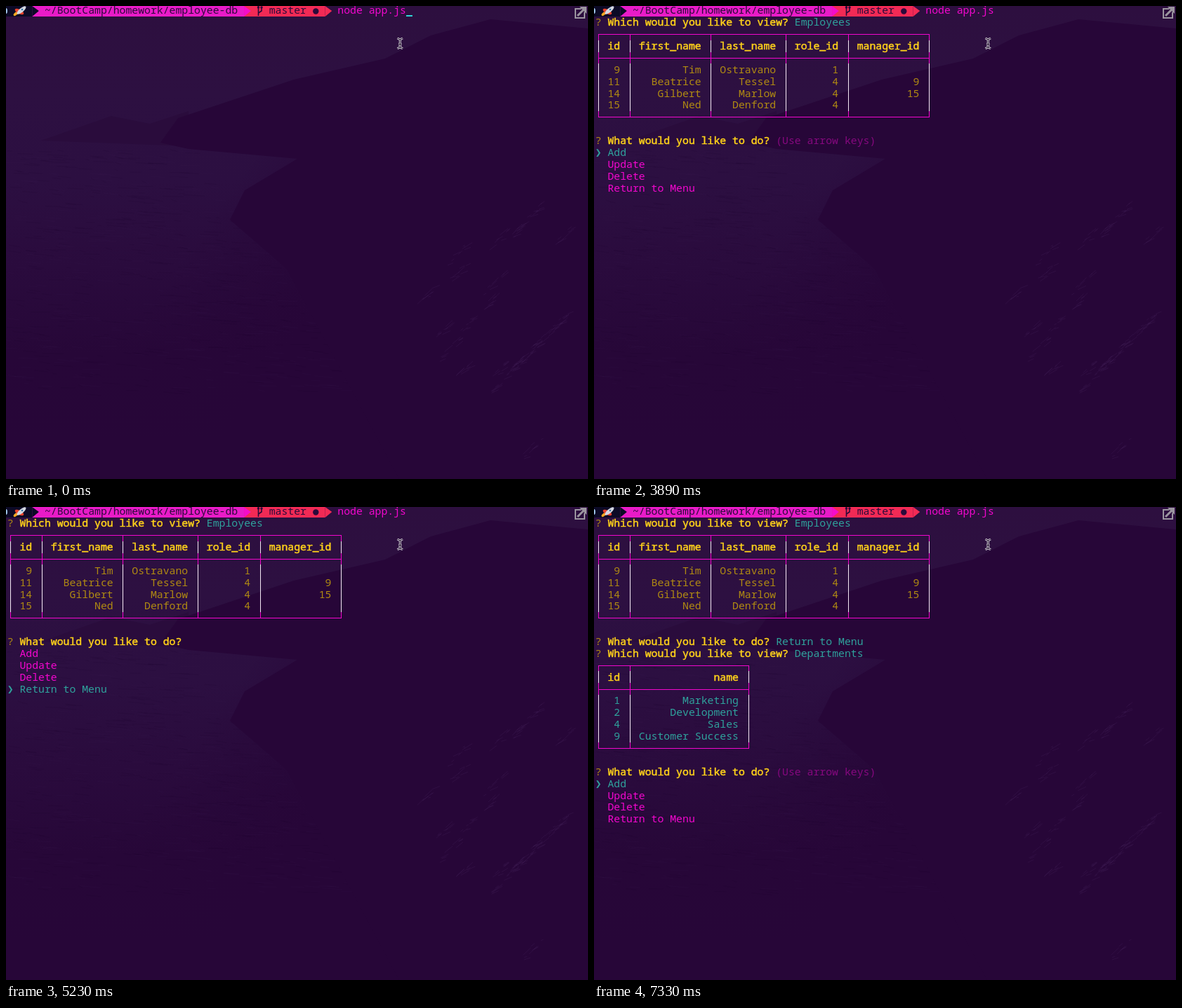
An HTML page with a canvas that plays this animation: 829x675 px, repeating every 8000 ms.

```html
<!DOCTYPE html>
<html lang="en">
<head>
<meta charset="utf-8">
<title>Employee terminal</title>
<style>
html, body { margin: 0; width: 100%; height: 100%; overflow: hidden; background: #270638; }
canvas { display: block; }
</style>
</head>
<body>
<canvas id="stage" width="829" height="675"></canvas>
<script>
const W = 829, H = 675, LOOP = 8000;
const CW = 8.88, LH = 16.88, LEFT = 1.7;
const PINK = '#f207cd', GOLD = '#ffd21a', DIM = '#b08a12', TEAL = '#2fa29c', HINT = '#86087f',
      INK = '#2a0a3b', CURSOR = '#2fd9d9', NAVY = '#0c0a26', RED = '#f22a55', GRAY = '#9b959f';
const VIEW = 'Which would you like to view?', TODO = 'What would you like to do?';
const VIEWS = ['Employees', 'Departments', 'Roles'];
const ACTIONS = ['Add', 'Update', 'Delete', 'Return to Menu'];
const STAFF = [
  'id|first_name|last_name|role_id|manager_id',
  '9|Tim|Ostravano|1|',
  '11|Beatrice|Tessel|4|9',
  '14|Gilbert|Marlow|4|15',
  '15|Ned|Denford|4|'
];
const DEPTS = ['id|name', '1|Marketing', '2|Development', '4|Sales', '9|Customer Success'];

let c = document.getElementById('stage').getContext('2d');
const colX = col => LEFT + col * CW;
const rowY = row => Math.floor(7 + row * LH);

function rect(x, y, w, h, color) {
  c.fillStyle = color;
  c.fillRect(x, y, w, h);
}

function trace(p) {
  c.beginPath();
  for (let i = 0; i < p.length; i += 2) c.lineTo(p[i], p[i + 1]);
}

function poly(color, ...p) {
  trace(p);
  c.fillStyle = color;
  c.fill();
}

function line(color, width, ...p) {
  trace(p);
  c.strokeStyle = color;
  c.lineWidth = width;
  c.stroke();
}

function ellipse(x, y, rx, ry, color, turn = 0) {
  c.beginPath();
  c.ellipse(x, y, rx, ry, turn, 0, 7);
  c.fillStyle = color;
  c.fill();
}

function text(row, col, str, color, strong) {
  const x = colX(col), y = Math.floor(11.9 + row * LH);
  c.font = '14.8px "Noto Sans Mono", "DejaVu Sans Mono", monospace';
  c.fillStyle = c.strokeStyle = color;
  c.lineWidth = .5;
  c.fillText(str, x, y);
  if (strong) c.strokeText(str, x, y);
}

function cursor(row, col) {
  rect(colX(col), Math.round(13 + row * LH), CW, 2, CURSOR);
}

function gradient(x0, y0, x1, y1, ...colors) {
  const g = c.createLinearGradient(x0, y0, x1, y1);
  colors.forEach((color, i) => g.addColorStop(i / (colors.length - 1), color));
  return g;
}

let seed = 7;
function rand(min = 0, max = 1) {
  seed = (seed * 16807) % 2147483647;
  return min + (max - min) * seed / 2147483647;
}

function ripples() {
  for (let i = 0; i < 650; i++) {
    const y = rand(205, 555), x = rand(0, 100 + y * .75);
    const tone = rand() < .6 ? '28,2,42' : '65,32,90';
    line(`rgba(${tone},.13)`, 1, x, y, x + rand(5, 30), y + rand(0, 3));
  }
}

function scratches(x, y, spread, n) {
  for (let i = 0; i < n; i++) {
    const k = rand(-spread, spread), len = rand(3, 12);
    const sx = x + k, sy = y - k + rand(-5, 5);
    line('rgba(85,50,110,.2)', 1, sx, sy, sx + len, sy - len * rand(.3, 1));
  }
}

function landscape() {
  rect(0, 0, W, H, gradient(0, 0, 0, 620, '#2d0f3f', '#2d1041', '#2c0f41', '#2a0b3d', '#270738', '#270638'));
  poly('#2a0c3c', 50, 192, 150, 157, 205, 168, 260, 150, 260, 200);
  rect(0, 200, W, H - 200, gradient(300, 290, 460, 400, 'rgba(39,6,56,0)', '#270638'));
  ripples();
  poly('#270638', 220, 195, 245, 160, 410, 105, 540, 75, 605, 42, 690, 19, W, 32,
    W, H, 560, H, 400, 375, 319, 305, 340, 263, 415, 218, 260, 204);
  scratches(745, 495, 55, 60);
  scratches(740, 308, 22, 20);
  for (let i = 0; i < 14; i++) scratches(rand(520, 810), rand(330, 650), 14, 8);
}

function rocket() {
  ellipse(14, 11, 4, 2, '#f6a623', -.7);
  ellipse(19, 8, 7, 3, '#e8432c', .5);
  ellipse(22, 6, 8, 3, '#d5d9e2', -.7);
  ellipse(23, 5, 1.3, 1.3, '#3576a8');
}

function segment(from, to, color, tip = color) {
  const x = colX(from), end = colX(to);
  rect(x, 0, end - x, 15, color);
  poly(tip, end, 0, end + CW + .8, 7, end, 15);
}

function branchIcon() {
  line(INK, 1.6, 359.5, 0, 359.5, 14);
  line(INK, 1.6, 359.5, 10, 364, 7, 364, 1);
  ellipse(359.5, 2, 1.8, 1.8, INK);
  ellipse(364, 2, 1.8, 1.8, INK);
}

function promptBar() {
  segment(38, 51, RED);
  segment(4, 38, '#e91bc8', '#f50dcb');
  segment(-1, 4, NAVY);
  ellipse(0, 7, 2, 4, '#9dc3e6');
  rocket();
  branchIcon();
  text(0, 6, '~/BootCamp/homework/employee-db', INK);
  text(0, 42, 'master', INK);
  ellipse(441.3, 7.5, 4.2, 4.2, INK);
  text(0, 53, 'node app.js', PINK);
}

function linkIcon() {
  c.strokeStyle = GRAY;
  c.lineWidth = 2;
  c.strokeRect(811, 4, 13, 13);
  for (const [color, w] of [[INK, 6], [GRAY, 3]]) line(color, w, 814, 14, 824, 4);
  poly(GRAY, 817, 1, 827, 1, 827, 11);
}

function pointer() {
  for (const [color, w] of [['#d8d4dc', 3], ['#1a0726', 1]]) {
    line(color, w, 561.3, 47, 561.3, 60);
    line(color, w, 559, 54.5, 563.5, 54.5);
    for (const side of [-1, 1])
      line(color, w, 557.5, 53.3 + side * 7.3, 561.3, 53.3 + side * 5.5, 565, 53.3 + side * 7.3);
  }
}

function ask(row, question, answer, color) {
  text(row, 0, '?', DIM);
  text(row, 2, question, GOLD, true);
  text(row, question.length + 3, answer, color);
}

function menu(row, question, items, picked, hint) {
  ask(row, question, hint ? '(Use arrow keys)' : '', HINT);
  items.forEach((item, i) => {
    const on = i === picked;
    if (on) text(row + 1 + i, 0, '❯', TEAL);
    text(row + 1 + i, 2, item, on ? TEAL : PINK);
  });
}

// Column widths follow the longest entry in each column
function table(row, data, color) {
  const rows = data.map(s => s.split('|'));
  const edges = [0];
  rows[0].forEach((_, i) =>
    edges.push(edges[i] + 3 + Math.max(...rows.map(r => r[i].length))));
  const edgeX = edges.map(col => Math.round(colX(col + .5) + .3));
  const last = row + 2 + rows.length;
  const top = r => rowY(r - .5);
  const upright = (x, y0, y1, tint) => rect(x, y0, 1, y1 - y0, tint);
  for (const x of edgeX) {
    upright(x, rowY(row), rowY(last), PINK);
    upright(x, top(row + 1), top(row + 2), '#f5e9f5');
    upright(x, top(row + 3), top(last), '#f5e9f5');
  }
  for (const r of [row, row + 2, last])
    rect(edgeX[0], rowY(r), edgeX.at(-1) - edgeX[0] + 1, 1, PINK);
  rows.forEach((cells, r) => cells.forEach((s, i) =>
    text(row + 1 + r + (r > 0), edges[i + 1] - 1 - s.length, s, r ? color : GOLD, !r)));
}

function session(t) {
  if (t < 1650) {
    if (t < 900 || t >= 1500) cursor(0, 64);
    return;
  }
  if (t < 1790) return cursor(1, 0);
  if (t < 3890) return menu(1, VIEW, VIEWS, 0, true);
  ask(1, VIEW, VIEWS[0], TEAL);
  table(2, STAFF, DIM);
  if (t < 6280) {
    const picked = [4940, 5090, 5230].filter(at => t >= at).length;
    return menu(11, TODO, ACTIONS, picked, picked === 0);
  }
  ask(11, TODO, ACTIONS[3], TEAL);
  if (t < 7330) return menu(12, VIEW, VIEWS, t < 6880 ? 0 : 1, t < 6880);
  ask(12, VIEW, VIEWS[1], TEAL);
  table(13, DEPTS, TEAL);
  menu(22, TODO, ACTIONS, 0, true);
}

const screen = c, backdrop = document.createElement('canvas');
backdrop.width = W;
backdrop.height = H;
c = backdrop.getContext('2d');
landscape();
c = screen;

const start = performance.now();
function frame(now) {
  c.drawImage(backdrop, 0, 0);
  promptBar();
  linkIcon();
  session(Math.max(0, now - start) % LOOP);
  pointer();
  requestAnimationFrame(frame);
}
frame(start);
</script>
</body>
</html>
```
